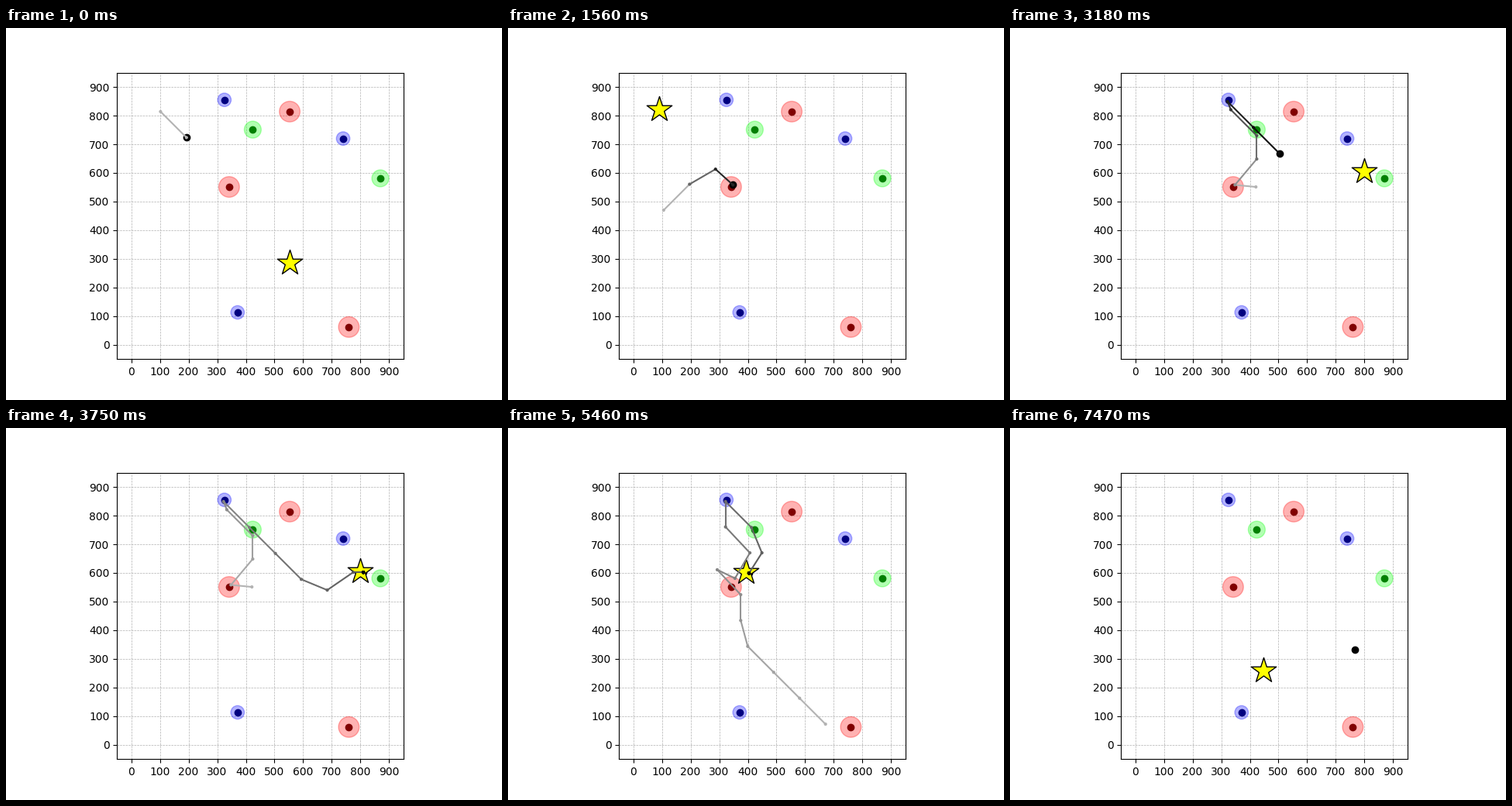
A matplotlib script for the animation above (7500 ms loop, 640 px wide and 480 px high).

```python
import matplotlib.pyplot as plt
import numpy as np
from matplotlib.animation import FuncAnimation
from matplotlib.collections import LineCollection
from matplotlib.patches import Circle

STEPS = 50       # steps per episode
MAX_MOVE = 90.5  # longest move per axis in one step
FRAMES = 250

# stops inside the landmark rings
RED, TOP_RED = (348, 558), (557, 814)
GREEN, BLUE = (424, 730), (322, 849)


def walk(start, stops):
    """Head for each stop with clipped moves, then rest at the last one."""
    path = [np.array(start, dtype=float)]
    for stop in stops:
        while np.any(path[-1] != stop):
            gap = np.subtract(stop, path[-1])
            short = np.abs(gap) <= MAX_MOVE
            path.append(np.where(short, stop,
                                 path[-1] + np.sign(gap) * MAX_MOVE))
    path += [path[-1]] * STEPS
    return np.array(path[:STEPS])


def episode(start, star, *stops):
    halt = (star[0] + 10, star[1] - 4)  # rests just beside the star's centre
    return star, walk(start, [*stops, halt])


episodes = [
    episode((102, 814), (553, 286), RED, GREEN, BLUE),
    episode((106, 470), (90, 821), (287, 613), RED, GREEN, BLUE),
    episode((421, 551), (800, 606), RED, GREEN, BLUE, (684, 540)),
    episode((671, 72), (394, 603), (375, 524), (293, 611), (355, 581),
            (407, 670), BLUE, (449, 670)),
    episode((735, 679), (646, 148), TOP_RED, (467, 724), BLUE,
            (829, 308), (780, 218)),
    episode((767, 332), (446, 260)),
]

fig, ax = plt.subplots(figsize=(6.4, 4.8), dpi=100)
ax.set_aspect("equal")
ax.set(xlim=(-50, 950), ylim=(-50, 950),
       xticks=range(0, 1000, 100), yticks=range(0, 1000, 100))
ax.set_axisbelow(True)
ax.grid(linestyle="--", linewidth=0.5)


def landmarks(ring, dot, radius, *points):
    for p in points:
        ax.add_patch(Circle(p, radius, color=ring, alpha=0.3, zorder=1))
    ax.scatter(*zip(*points), color=dot, zorder=1.1)


landmarks("red", "maroon", 36, (553, 814), (341.5, 551), (759.5, 62))
landmarks("lime", "green", 29.5, (424, 751), (869.5, 581))
landmarks("blue", "navy", 23.5, (325, 855), (739.5, 720), (371, 113))

agent = ax.scatter([0], [0], color="black", zorder=1.2)
goal = ax.scatter([0], [0], s=600, marker="*", color="yellow",
                  edgecolors="black", linewidths=1, zorder=1.3)
trail = LineCollection([], linewidths=1.5, zorder=2)
ax.add_collection(trail, autolim=False)
joints = ax.scatter([], [], s=4, linewidths=1, zorder=2.1)


def draw(frame):
    # the loop opens one step into the first episode
    index, step = divmod(frame + 1, STEPS)
    star, path = episodes[index]
    pts = path[:step + 1]
    goal.set_offsets([star])
    agent.set_offsets(pts[-1:])

    # oldest moves are light grey, the newest nearly black
    grey = 0.7 * (1 - np.arange(step) / max(step, 1)) ** 1.4
    colors = [(g, g, g) for g in grey]
    trail.set_segments(list(np.stack([pts[:-1], pts[1:]], axis=1)))
    trail.set_color(colors)
    joints.set_offsets(pts if step else np.empty((0, 2)))
    joints.set_color(colors + colors[-1:])
    return trail, joints, agent, goal


anim = FuncAnimation(fig, draw, frames=FRAMES, init_func=lambda: draw(0),
                     interval=30, repeat=True, repeat_delay=0, blit=False)
plt.show()
```
